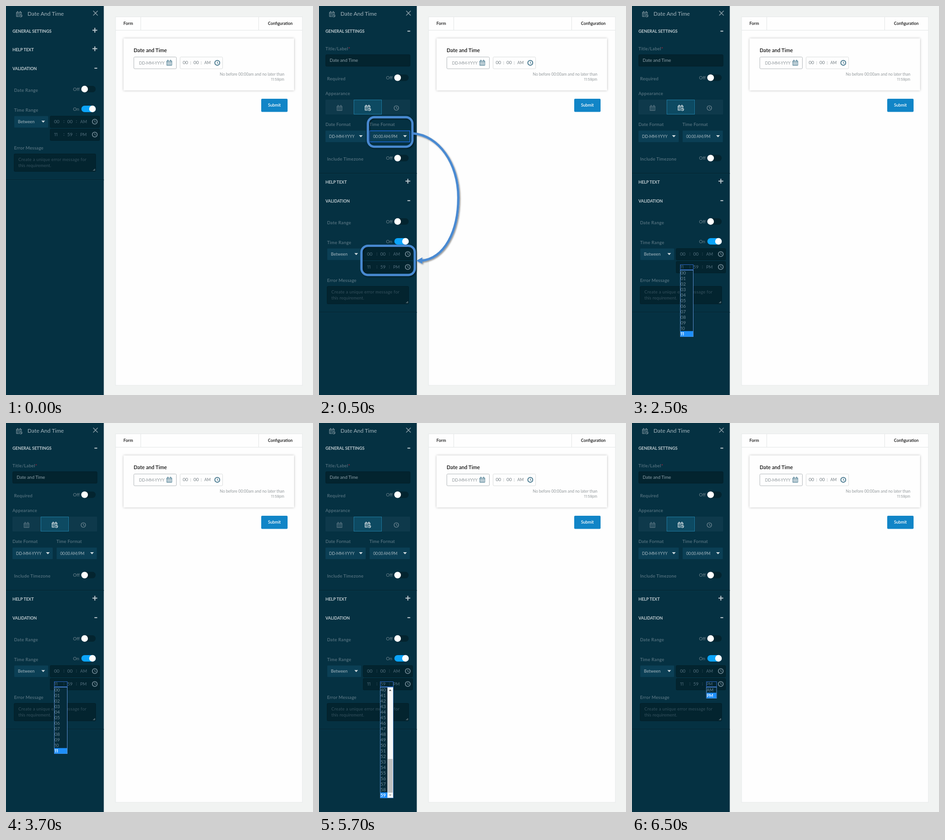
Write an HTML page that moves like this. It is 664x843 px and loops after 8000 ms.

```html
<!DOCTYPE html>
<html lang="en">
<head>
<meta charset="utf-8">
<title>Date and time settings</title>
<style>
  html, body { margin: 0; width: 100%; height: 100%; overflow: hidden; background: #f1f3f2; }
  svg { display: block; width: 664px; height: 843px; }
  text { font-family: Lato, "Open Sans", sans-serif; white-space: pre; }
  .narrow { font-family: Inter, sans-serif; }
  .shut, .open, .hint, .hours, .mins, .half, #lower { animation: 8s step-end infinite; }
  .shut { animation-name: shut; }
  .open { animation-name: open; }
  .hint { animation-name: hint; }
  .hours { animation-name: hours; }
  .mins { animation-name: mins; }
  .half { animation-name: half; }
  #lower { animation-name: drop; }
  @keyframes shut { 0% { visibility: visible } 6.25%, 100% { visibility: hidden } }
  @keyframes open { 0% { visibility: hidden } 6.25%, 100% { visibility: visible } }
  @keyframes hint { 0% { visibility: hidden } 6.25% { visibility: visible } 31.25%, 100% { visibility: hidden } }
  @keyframes hours { 0% { visibility: hidden } 31.25% { visibility: visible } 56.25%, 100% { visibility: hidden } }
  @keyframes mins { 0% { visibility: hidden } 56.25% { visibility: visible } 81.25%, 100% { visibility: hidden } }
  @keyframes half { 0% { visibility: hidden } 81.25%, 100% { visibility: visible } }
  @keyframes drop { 0% { transform: none } 6.25%, 100% { transform: translateY(287px) } }
</style>
</head>
<body>
<svg id="stage" viewBox="0 0 664 843" xmlns="http://www.w3.org/2000/svg"></svg>
<script>
const LABEL = '#5f7a87', DIM = '#536f7e', DARK = '#03242f', SELECT = '#0b3f55', BLUE = '#4a8ad2';

const text = (x, y, str, size, fill, more = '') =>
  `<text x="${x}" y="${y}" font-size="${size}" fill="${fill}" ${more}>${str}</text>`;
const rect = (x, y, w, h, fill, more = '') =>
  `<rect x="${x}" y="${y}" width="${w}" height="${h}" fill="${fill}" ${more}/>`;
const path = (d, stroke, width, more = '') =>
  `<path d="${d}" fill="none" stroke="${stroke}" stroke-width="${width}" ${more}/>`;
const group = (cls, ...parts) => `<g class="${cls}">${parts.join('')}</g>`;

const label = (x, y, str, gap = .35) =>
  text(x, y, str, 9.5, LABEL, `font-weight="500" letter-spacing="${gap}"`);
const section = (y, str, size = 9) => text(14, y, str, size, '#c3ced3', 'font-weight="700"');
const plus = y => path(`M187 ${y}h10.4M192.2 ${y - 5.2}v10.4`, '#c3ced3', 2);
const minus = y => path(`M191.3 ${y}h6`, '#c3ced3', 2);
const arrow = (x, y) => `<path d="M${x} ${y}h8l-4 4.4z" fill="#d3dde1"/>`;
const divider = y => rect(0, y, 211.5, 1, '#03222e') + rect(0, y + 1, 211.5, 1, '#083749');

function toggle(y, on) {
  return text(145, y + 3.6, on ? 'On' : 'Off', 9.7, '#70858f') +
    rect(163, y - 7, 31, 14, on ? '#0ba4fa' : DARK, 'rx="7"') +
    `<circle cx="${on ? 187 : 170}" cy="${y}" r="7.2" fill="#fefefe"/>`;
}

function select(x, y, w, str, size, gap = 0) {
  return rect(x, y, w, 25, SELECT, 'rx="1"') +
    text(x + 7.8, y + 15.5, str, size, '#a9bac2', `letter-spacing="${gap}"`) +
    arrow(x + w - 14.5, y + 10);
}

function clock(x, y, color, r = 5.3, w = 1.8) {
  return `<circle cx="${x}" cy="${y}" r="${r}" fill="none" stroke="${color}" stroke-width="${w}"/>` +
    path(`M${x} ${y - 3}v3l2.2 1.6`, color, 1.2);
}

function calendar(x, y, color, bg, badge) {
  let s = path(`M${x + .5} ${y + 2.5}h11v9.5h-11zM${x + .5} ${y + 4.6}h11`, color, 1) +
    path(`M${x + 3} ${y}v3.2M${x + 9} ${y}v3.2`, color, 1.5);
  for (let i = 0; i < 9; i++)
    s += rect(x + 2 + i % 3 * 3, y + 6 + (i / 3 | 0) * 2, 1.8, 1.2, color);
  if (badge) s += `<circle cx="${x + 10}" cy="${y + 10}" r="4.4" fill="${bg}"/>` +
    clock(x + 10, y + 10, color, 3, 1);
  return s;
}

const digits = (x, y, str, color, size = 10) => str[0] === '1'
  ? text(x, y, str, size - .8, color, 'class="narrow"')
  : text(x, y, str, size, color);

function timeRow(y, h, m, half) {
  const base = y + 16;
  return rect(95.5, y + .5, 107, 25, DARK, 'rx="2" stroke="#022029"') +
    digits(104, base, h, DIM) + text(124, base - 1, ':', 10, DIM) +
    digits(132.5, base, m, DIM) + text(151, base - 1, ':', 10, DIM) +
    text(160.6, base, half, 9.1, DIM) + clock(192, y + 12.6, '#6c8591');
}

function list(cls, x, w, items, pick, bar = 0) {
  const h = items.length * 12;
  let s = rect(x + .5, 560.5, w - 1, 11, 'none', 'stroke="#2b66c4"') +
    rect(x + .5, 572.5, w - 1, h, '#052b3a', 'stroke="#5b8fd0"');
  items.forEach((item, i) => {
    const on = item === pick, y = 572.5 + i * 12;
    if (on) s += rect(x + 1, y, w - 2 - bar, 12, '#1e8ffb');
    s += digits(x + 1, y + 9, item, on ? '#fff' : '#6f8a98', /\d/.test(item) ? 9.8 : 9.1)
      .replace('<text', on ? '<text font-weight="600"' : '<text');
  });
  if (bar) {
    const left = x + w - 1 - bar, mid = left + bar / 2;
    s += rect(left, 573, bar, h - 1, '#f6f7f7') + rect(left + .7, 728, bar - 1.4, 73, '#bfc1c1') +
      `<path d="M${mid - 2.7} 580.5h5.4l-2.7-3z" fill="#444"/>` +
      `<path d="M${mid - 2.7} 805h5.4l-2.7 3z" fill="#a5a39c"/>`;
  }
  return group(cls, s);
}

const range = (from, to) =>
  Array.from({ length: to - from + 1 }, (_, i) => String(from + i).padStart(2, '0'));

const form = [
  rect(237, 23.5, 404, 798.5, '#fefefe', 'stroke="#e6e9e9"'),
  path('M237 52.5H641M291.5 24V52M546.5 24V52', '#e2e6e6', 1),
  text(254, 41, 'Form', 9, '#111', 'font-weight="600"'),
  text(566.6, 40.6, 'Configuration', 8.8, '#111', 'font-weight="600"'),
  rect(254.5, 70.5, 368.5, 112.5, '#fefefe', 'filter="url(#glow)"'),
  text(276, 99.8, 'Date and Time', 11.2, '#111', 'font-weight="600"'),
  rect(276.5, 110.5, 92, 25.5, '#fefefe', 'rx="2" stroke="#b3b8bb"'),
  text(287.8, 126.6, 'DD-MM-YYYY', 8.6, '#8f979b', 'letter-spacing="-.15"'),
  calendar(347.2, 116.6, '#41748b', '#fff'),
  rect(376.5, 110.5, 92, 25.5, '#fefefe', 'rx="2" stroke="#dadddd"'),
  ...['00', ':', '00', ':'].map((s, i) => text([382.3, 398, 405.4, 421][i], 126.4, s, 10, '#737d83')),
  text(429, 126.4, 'AM', 8.6, '#737d83'),
  clock(457, 123.2, '#41748b'),
  text(602, 151.4, 'No before 00:00am and no later than', 8.6, '#92989b', 'text-anchor="end"'),
  text(602, 161.8, '11:59pm', 7.6, '#92989b', 'text-anchor="end" class="narrow"'),
  rect(552, 201, 57, 28.5, '#1185c7', 'rx="2"'),
  text(566.8, 218.4, 'Submit', 8.9, '#fff', 'font-weight="600"')
];

const header = [
  rect(0, 0, 211.5, 843, '#053142'),
  calendar(22, 11, '#7d939d', '#053142', true),
  text(46.6, 21.4, 'Date And Time', 12, '#a5b6be'),
  path('M188.6 10.6l9.8 9.8M198.4 10.6l-9.8 9.8', '#8da1aa', 1.4),
  section(58.4, 'GENERAL SETTINGS'),
  group('shut', plus(52.5))
];

const general = group('open',
  minus(54.5),
  label(14, 95.8, 'Title/Label'),
  text(63, 95.6, '*', 10, '#b5233c'),
  rect(14.5, 105.5, 182.5, 25, DARK, 'rx="2" stroke="#021e28"'),
  text(23, 121.2, 'Date and Time', 9.6, '#8ea1aa'),
  label(17.4, 160.6, 'Required'), toggle(155.4),
  label(14, 193.3, 'Appearance'),
  rect(14, 203, 183, 32, '#0e394b', 'rx="1"'),
  path('M136.5 203v32', '#082f3f', 1),
  rect(75.5, 203.5, 60, 31, '#0d4a62', 'stroke="#1f7ba1"'),
  calendar(38.4, 214.6, '#5d7885', '#0e394b'),
  calendar(99, 214, '#e8eef0', '#0d4a62', true),
  clock(167.3, 221, '#6a838f', 4.9, 1.4),
  label(14, 260.4, 'Date Format', .2),
  label(109, 260.4, 'Time Format', .2),
  select(14, 270, 87, 'DD-MM-YYYY', 8.6, -.15),
  select(109.5, 270, 87, '00:00 AM/PM', 8.5, -.2),
  label(17.4, 335, 'Include Timezone'), toggle(329.6),
  divider(362)
);

const lower = `<g id="lower">` + [
  section(98.4, 'HELP TEXT'), plus(92.6),
  section(138.7, 'VALIDATION', 8.8), minus(134.8),
  label(17.4, 185.5, 'Date Range'), toggle(180),
  label(17.4, 228.6, 'Time Range'), toggle(223, true),
  select(18, 238.4, 73, 'Between', 9.2),
  timeRow(238, '00', '00', 'AM'),
  timeRow(266, '11', '59', 'PM'),
  label(17.4, 311.2, 'Error Message', .3),
  rect(17.5, 320.5, 176.5, 38, DARK, 'rx="2" stroke="#021e28"'),
  text(26.8, 336.4, 'Create a unique error message for', 9.3, '#36525f', 'letter-spacing=".28"'),
  text(26.8, 348.9, 'this requirement.', 9.3, '#36525f', 'letter-spacing=".1"'),
  path('M188.5 357l4-4M191 357l1.7-1.7', '#a9b6bb', 1),
  divider(376)
].join('') + '</g>';

const hint = group('hint',
  rect(109.5, 270.5, 87, 24, 'none', 'stroke="#1c6be0" stroke-width="1.4"'),
  `<g filter="url(#shade)">` +
    rect(105.7, 241, 96.3, 63.8, 'none', `rx="14" stroke="${BLUE}" stroke-width="4.8"`) +
    rect(91.8, 519.6, 115.4, 63.2, 'none', `rx="14" stroke="${BLUE}" stroke-width="4.8"`) +
    path('M203 276C258 280 301.3 340 301.3 415C301.3 488 272 547 221 552', BLUE, 5) +
    `<path d="M210.5 552l13-7.2v14z" fill="${BLUE}"/></g>`
);

document.getElementById('stage').innerHTML =
  `<defs>
    <filter id="glow" x="-5%" y="-10%" width="110%" height="120%">
      <feDropShadow dx="0" dy="0" stdDeviation="2.6" flood-color="#000" flood-opacity=".27"/>
    </filter>
    <filter id="shade" x="-10%" y="-10%" width="125%" height="125%">
      <feDropShadow dx="2" dy="2" stdDeviation="1.5" flood-color="#000" flood-opacity=".42"/>
    </filter>
  </defs>` +
  rect(0, 0, 664, 843, '#f1f3f2') + form.join('') + header.join('') + general + lower + hint +
  list('hours', 104, 29, range(0, 11), '11') +
  list('mins', 132, 29, range(40, 59), '59', 12) +
  list('half', 160.5, 23, ['AM', 'PM'], 'PM');
</script>
</body>
</html>
```
